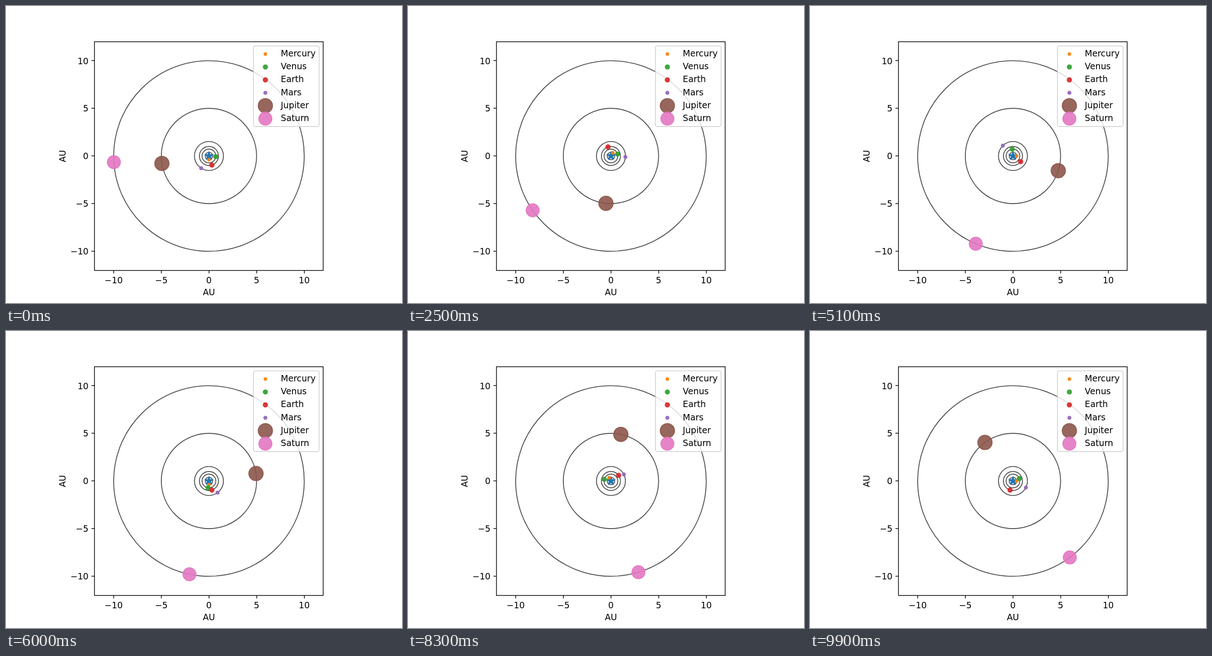
These frames come from a looping animation (864 px wide and 648 px high, 10 s). An HTML page:

```html
<!DOCTYPE html>
<html lang="en">
<head>
<meta charset="utf-8">
<title>Planet orbits</title>
<style>
  html, body { margin: 0; width: 100%; height: 100%; overflow: hidden; background: #fff; }
  svg { display: block; }
  text { font: 18.75px "DejaVu Sans", sans-serif; }
  .mid { text-anchor: middle; }
  .end { text-anchor: end; }
  .axis { fill: none; stroke: #000; stroke-width: 1.5; }
  .orbit { fill: none; stroke: #000; stroke-opacity: .7; stroke-width: 1.875; }
  .planet { fill-opacity: .9; stroke-opacity: .9; stroke-width: 1.875; }
  .star { fill: #1f77b4; stroke: #1f77b4; stroke-width: 1.875; stroke-linejoin: round; }
  .box { fill: #fff; fill-opacity: .8; stroke: #ccc; stroke-opacity: .8; stroke-width: 1.875; }
</style>
</head>
<body>
<svg id="stage" width="864" height="648" viewBox="0 0 864 648"></svg>
<script>
const CX = 442.8, CY = 327.24, AU = 20.79;
const STEP_MS = 100, STEPS = 100, YEARS_PER_STEP = 0.1, FIRST_STEP = 3;

// orbit in AU, period in years, radius in km
const planets = [
  { name: 'Mercury', orbit: 0.39, period: 0.24, km: 2440, color: '#ff7f0e' },
  { name: 'Venus', orbit: 0.72, period: 0.616, km: 6052, color: '#2ca02c' },
  { name: 'Earth', orbit: 1, period: 1, km: 6371, color: '#d62728' },
  { name: 'Mars', orbit: 1.52, period: 1.88, km: 3390, color: '#9467bd' },
  { name: 'Jupiter', orbit: 5, period: 12, km: 69911, color: '#8c564b' },
  { name: 'Saturn', orbit: 10, period: 29, km: 58232, color: '#e377c2' }
];

// marker area grows with the planet's radius
const dot = (p, x, y) =>
  `<circle class="planet" cx="${x}" cy="${y}" r="${0.9375 * Math.sqrt(p.km / 250)}" fill="${p.color}" stroke="${p.color}"/>`;

const label = (text, x, y, attrs = '') => `<text x="${x}" y="${y}" ${attrs}>${text}</text>`;

const starPoints = Array.from({ length: 10 }, (_, i) => {
  const r = 9.375 * (i % 2 ? 0.382 : 1), a = i * Math.PI / 5;
  return [CX + r * Math.sin(a), CY - r * Math.cos(a)];
}).join(' ');

const ticks = [-10, -5, 0, 5, 10].map(v => {
  const x = CX + v * AU, y = CY - v * AU, text = String(v).replace('-', '\u2212');
  return `<path class="axis" d="M${Math.round(x)} 577v6.56M193 ${Math.round(y)}h-6.56"/>` +
    label(text, x, 604.5, 'class="mid"') + label(text, 180, y + 7.2, 'class="end"');
}).join('');

const legend = '<rect class="box" x="539.9" y="87.1" width="143.3" height="175.9" rx="3.75"/>' +
  planets.map((p, i) =>
    dot(p, 565.9, 104.8 + 28.2 * i) + label(p.name, 599.6, 109.6 + 28.3 * i)).join('');

const stage = document.getElementById('stage');
stage.innerHTML =
  planets.map(p => `<circle class="orbit" cx="${CX}" cy="${CY}" r="${p.orbit * AU}"/>`).join('') +
  `<polygon class="star" points="${starPoints}"/>` +
  `<g id="movers">${planets.map(p => dot(p, CX, CY)).join('')}</g>` +
  ticks +
  '<rect class="axis" x="193" y="78" width="499" height="499"/>' +
  label('AU', CX, 631, 'class="mid"') +
  label('AU', 0, 0, 'class="mid" transform="translate(129.5 327.5) rotate(-90)"') +
  legend;

const movers = document.getElementById('movers').children;

function draw(now) {
  const step = Math.floor(now / STEP_MS) % STEPS + FIRST_STEP;
  planets.forEach((p, i) => {
    const angle = 2 * Math.PI * step * YEARS_PER_STEP / p.period;
    movers[i].setAttribute('cx', CX - p.orbit * AU * Math.cos(angle));
    movers[i].setAttribute('cy', CY + p.orbit * AU * Math.sin(angle));
  });
  requestAnimationFrame(draw);
}
draw(0);
</script>
</body>
</html>
```
